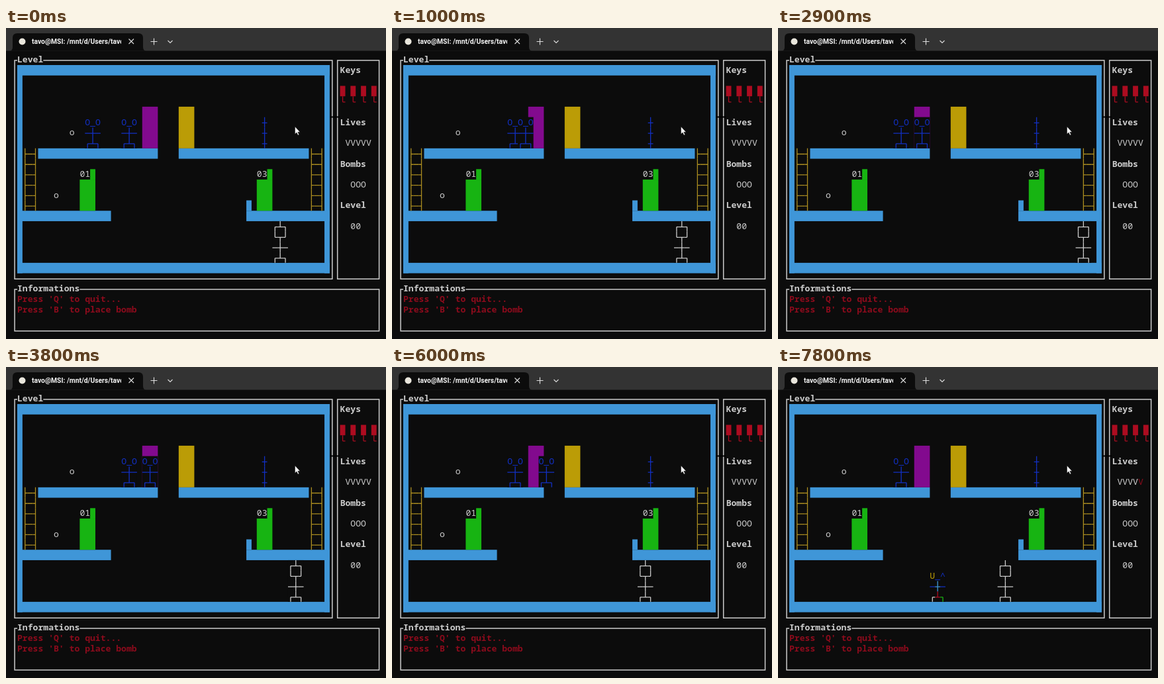
Animation of 574 by 470 pixels, one loop 8 s. Source, as an HTML page:

```html
<!DOCTYPE html>
<html lang="en">
<head>
<meta charset="utf-8">
<title>Terminal platform game</title>
<style>
  html, body { margin: 0; width: 100%; height: 100%; overflow: hidden; background: #0c0c0c; }
  svg { display: block; width: 574px; height: 470px; }
  .term text { font: 13.108px "Noto Sans Mono", "DejaVu Sans Mono", monospace; white-space: pre; }
  .term text.bold { font-weight: 600; }
  .term path { fill: none; stroke-width: 1.3; }
  .tab { font: 600 10.3px Roboto, "Noto Sans", sans-serif; fill: #f4f4f4; }
</style>
</head>
<body>
<svg viewBox="0 0 574 470">
  <defs><clipPath id="tabClip"><rect x="36" y="10" width="138" height="22"/></clipPath></defs>
  <rect width="574" height="470" fill="#0c0c0c"/>
  <rect width="574" height="34.5" fill="#333"/>
  <path d="M5 34.5Q10 34.5 10 29V15Q10 8 17 8H200Q207 8 207 15V29Q207 34.5 212 34.5Z" fill="#0c0c0c"/>
  <circle cx="24.5" cy="20.5" r="5" fill="#e9e6dc"/>
  <text class="tab" x="39" y="24" clip-path="url(#tabClip)">tavo@MSI: /mnt/d/Users/tavo</text>
  <g fill="none" stroke="#ddd" stroke-width="1.1">
    <path d="M185.5 16.5l7.5 7.5m0-7.5l-7.5 7.5"/>
    <path d="M218.5 20.5h10m-5-5v10"/>
    <path d="M244.5 19l3.5 3.5 3.5-3.5"/>
  </g>
  <g class="term" id="term" transform="translate(17 56)"></g>
  <path d="M436.5 149v11.2l2.5-2.3 2 4.2 1.7-.8-1.9-4.1h3.4Z" fill="#fff" stroke="#111" stroke-width=".5"/>
</svg>
<script>
const W = 7.865, H = 15.73, LOOP = 8000;
const MID = H / 2 + .8; // height of the horizontal strokes inside a cell
const BLACK = '#0c0c0c', GREY = '#cccccc', CYAN = '#3f96d8', BLUE = '#1230c4', RED = '#ac0c20',
      DARK_RED = '#8c0b1c', GREEN = '#17b412', YELLOW = '#bb9c06', OCHRE = '#ab8d20', PURPLE = '#820a8e';
const ARMS = { '─': 'lr', '│': 'ud', '┼': 'lrud', '┴': 'lru', '┬': 'lrd', '┌': 'rd',
               '┐': 'ld', '└': 'ru', '┘': 'lu', '├': 'udr', '┤': 'udl' };
const ENDS = { l: `H-${W / 2}`, r: `H${W / 2}`, u: `V-${MID}`, d: `V${H - MID}` };
const term = document.getElementById('term');

function add(parent, tag, attrs, content) {
  const el = document.createElementNS('http://www.w3.org/2000/svg', tag);
  for (const k in attrs) el.setAttribute(k, attrs[k]);
  if (content) el.textContent = content;
  parent.append(el);
  return el;
}
function block(c, r, w, h, fill, parent = term) {
  add(parent, 'rect', { x: c * W, y: r * H, width: w * W, height: h * H, fill });
}
function label(c, r, s, fill = GREY, parent = term, cls = '') {
  return add(parent, 'text', { x: c * W, y: r * H + 12, fill, class: cls }, s);
}
function bold(c, r, s, fill = GREY) {
  label(c, r, s, fill, term, 'bold');
}
// Box-drawing characters become strokes from the middle of the cell.
function lines(c, r, s, stroke, parent = term) {
  [...s].forEach((ch, i) => {
    const d = [...ARMS[ch]].map(a => 'M0 0' + ENDS[a]).join('');
    add(parent, 'path', { d, stroke, transform: `translate(${(c + i + .5) * W} ${r * H + MID})` });
  });
}
function frame(c, r, w, h, title) {
  add(term, 'rect', { x: (c + .5) * W, y: r * H + MID, width: w * W, height: h * H,
                      fill: 'none', stroke: GREY, 'stroke-width': 1.5 });
  if (title) {
    block(c + 1, r, title.length, 1, BLACK);
    bold(c + 1, r, title);
  }
}
function sprite(height) {
  const g = add(term, 'g', {});
  block(-1, 0, 3, height, BLACK, g);
  return g;
}
function person() {
  const g = sprite(3);
  label(-1, 0, 'O_O', BLUE, g);
  lines(-1, 1, '─┼─', BLUE, g);
  lines(-1, 2, '┌┴┐', BLUE, g);
  return g;
}
function place(g, c, r) {
  g.setAttribute('transform', `translate(${c * W} ${r * H})`);
}

// Panels
frame(-1, -1, 61, 21, 'Level');
frame(61, -1, 8, 21);
frame(-1, 21, 70, 4, 'Informations');
add(term, 'rect', { x: 473, y: 77.5, width: 14, height: 2, fill: '#000' });
bold(0, 22, "Press 'Q' to quit...", DARK_RED);
bold(0, 23, "Press 'B' to place bomb", DARK_RED);
bold(62, 0, 'Keys');
for (let c = 62; c < 69; c += 2) {
  block(c, 2, 1, 1, RED);
  lines(c, 3, '└', RED);
}
bold(62, 5, 'Lives');
label(63, 7, 'VVVV');
const lastLife = label(67, 7, 'V');
bold(62, 9, 'Bombs');
label(64, 11, 'OOO');
bold(62, 13, 'Level');
label(64, 15, '00');

// Level
[[0, 0, 60, 1], [0, 19, 60, 1], [0, 0, 1, 20], [59, 0, 1, 20], [4, 8, 23, 1], [31, 8, 25, 1],
 [0, 14, 18, 1], [44, 14, 16, 1], [44, 13, 1, 1]].forEach(b => block(...b, CYAN));
for (let r = 8; r < 14; r++) for (const c of [1, 56]) lines(c, r, '├─┤', OCHRE);
block(24, 4, 3, 4, PURPLE);
block(31, 4, 3, 4, YELLOW);
for (const [c, s] of [[12, '01'], [46, '03']]) {
  block(c, 11, 3, 3, GREEN);
  block(c + 2, 10, 1, 1, GREEN);
  label(c, 10, s);
}
label(10, 6, 'o');
label(7, 12, 'o');
for (let r = 5; r < 8; r++) lines(47, r, '┼', BLUE);

// Characters
place(person(), 21, 5);
const player = person();

const hurt = sprite(3);
label(-1, 0, 'U', YELLOW, hurt);
label(0, 0, '_^', BLUE, hurt);
lines(-1, 1, '─', BLUE, hurt);
lines(0, 1, '┼', CYAN, hurt);
lines(1, 1, '─', BLUE, hurt);
lines(-1, 2, '┌', GREY, hurt);
lines(0, 2, '┴', RED, hurt);
lines(1, 2, '┐', GREEN, hurt);
place(hurt, 28, 16);

const robot = sprite(4);
['┌┴┐', '└┬┘', '─┼─', '┌┴┐'].forEach((s, r) => lines(-1, r, s, GREY, robot));

function draw(now) {
  const t = Math.floor((now % LOOP) / 100) * 100;

  // The robot paces right to the wall and turns back.
  place(robot, 57 - Math.abs(7 - Math.floor(t / 330)), 15);

  const walk = Math.min(25, 14 + Math.floor(t / 110));
  const col = walk + (t >= 4400) + (t >= 4700) + (t >= 6100);
  const fall = t < 6100 ? 0 : t < 6300 ? 1 : Math.min(11, (t - 6000) / 100);
  place(player, col, 5 + fall);

  const dead = t >= 7100;
  player.style.display = dead ? 'none' : '';
  hurt.style.display = dead ? '' : 'none';
  lastLife.setAttribute('fill', dead ? DARK_RED : GREY);
}

const start = performance.now();
function tick() {
  draw(performance.now() - start);
  requestAnimationFrame(tick);
}
tick();
</script>
</body>
</html>
```
